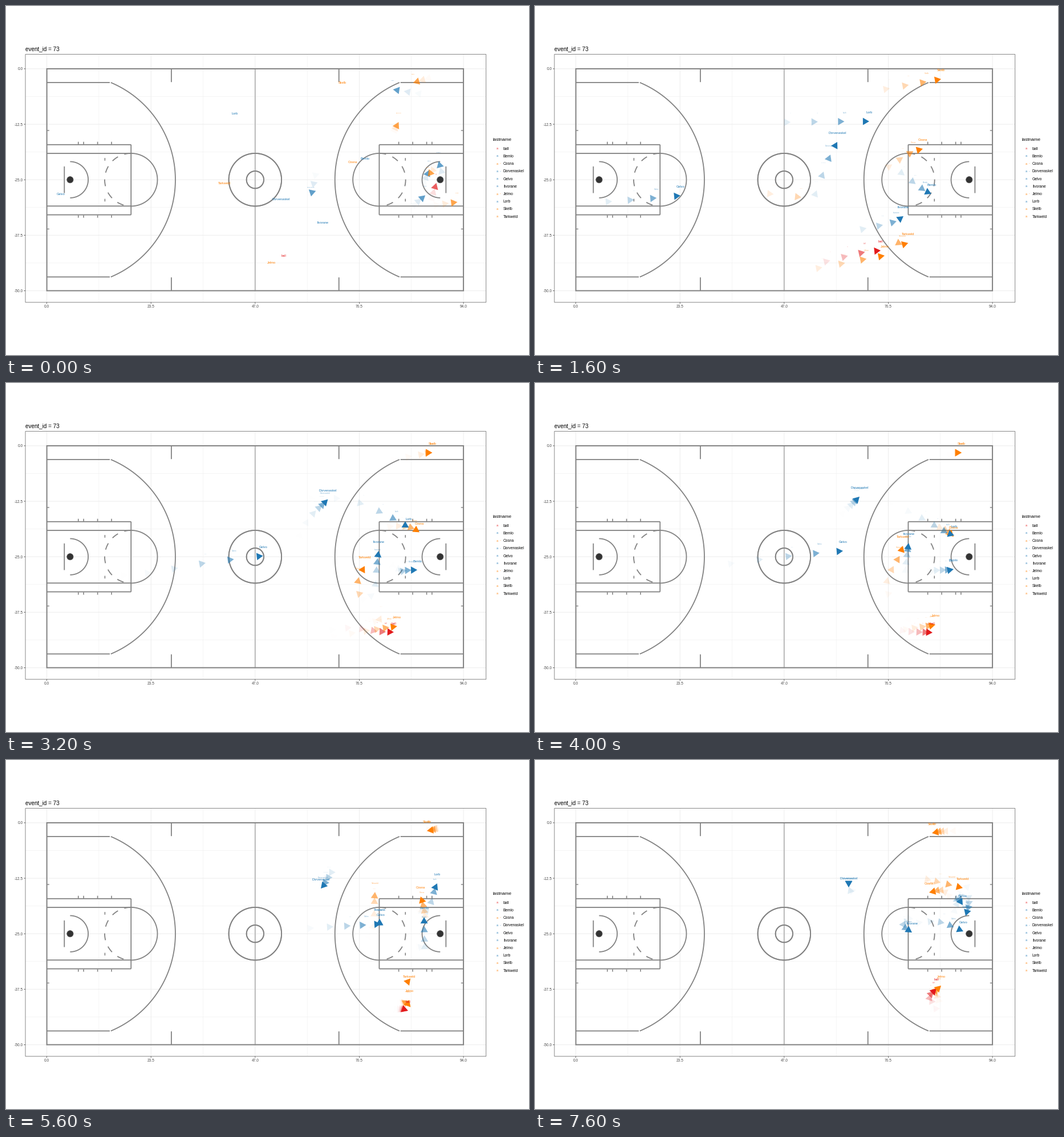
A matplotlib script for the animation above (8 s loop, 917x611 px).

```python
import numpy as np
import matplotlib.pyplot as plt
from matplotlib.animation import FuncAnimation
from matplotlib.collections import PolyCollection
from matplotlib.colors import to_rgba
from matplotlib.patches import Circle, Rectangle

W, H, DPI = 917, 611, 100
FRAMES, INTERVAL = 20, 400
PX = 72 / DPI
FOOT = 7.771                      # pixels per foot
LEFT, TOP = 71.6, 109.9
RIGHT, BOTTOM = LEFT + 94 * FOOT, TOP + 50 * FOOT
MID_X, MID_Y = (LEFT + RIGHT) / 2, (TOP + BOTTOM) / 2
RED, BLUE, ORANGE = "#e31a1c", "#1f78b4", "#ff7f00"
GREY = "#828282"

plt.rcParams["font.family"] = "Liberation Sans"
plt.rcParams["path.snap"] = False
fig = plt.figure(figsize=(W / DPI, H / DPI), dpi=DPI, facecolor="white")
ax = fig.add_axes([0, 0, 1, 1])
ax.set(xlim=(0, W), ylim=(H, 0))
ax.axis("off")


def line(xs, ys, color=GREY, width=1.8, z=2, **kw):
    ax.plot(xs, ys, color=color, lw=width * PX, zorder=z,
            solid_capstyle="butt", **kw)


def text(x, y, s, size, color="black", ha="center", **kw):
    return ax.text(x, y, s, fontsize=size * PX, color=color, ha=ha,
                   va="center_baseline", **kw)


def box(x0, y0, x1, y1, color, width, z):
    ax.add_patch(Rectangle((x0, y0), x1 - x0, y1 - y0, fill=False,
                           ec=color, lw=width * PX, zorder=z))


def draw_panel():
    x0, x1, y0, y1 = 34, 841.7, 84.6, 518.8
    for k in range(9):
        major = k % 2 == 0
        width = 0.9 if major else 0.45
        x, y = LEFT + k * 11.75 * FOOT, TOP + k * 6.25 * FOOT
        line([x, x], [y0, y1], "#ebebeb", width, 1)
        line([x0, x1], [y, y], "#ebebeb", width, 1)
        if major:
            line([x, x], [y1, y1 + 2.5], "#333333", 0.8)
            line([x0 - 2.5, x0], [y, y], "#333333", 0.8)
            text(x, 526, f"{k * 11.75:.1f}", 6.7, "#4d4d4d")
            text(30, y, f"{-k * 6.25:.1f}", 6.7, "#4d4d4d", "right")
    box(x0, y0, x1, y1, "#7a7a7a", 0.9, 6)
    text(34, 74, "event_id = 73", 9.9, ha="left")


def draw_half(side):
    """One half of the court in feet from its hoop end; side is 1 or -1."""
    def seg(xa, ya, xb, yb, width=1.8):
        for s in (-1, 1):
            line(MID_X + side * (np.array([xa, xb]) - 47) * FOOT,
                 MID_Y + s * np.array([ya, yb]) * FOOT, width=width)

    def curve(x, r, start, end, **kw):
        a = np.radians(np.linspace(start, end, 120))
        line(MID_X + side * (x - 47 + r * np.cos(a)) * FOOT,
             MID_Y + r * np.sin(a) * FOOT, **kw)

    hoop, foul, three, corner = 5.25, 19, 23.75, 21.9
    angle = np.degrees(np.arcsin(corner / three))
    curve(hoop, three, -angle, angle)
    curve(hoop, 4.08, -90, 90)
    curve(foul, 5.95, -90, 90)
    curve(foul, 5.95, 270, 90, dashes=(12 / 1.8, 12 / 1.8))
    curve(47, 5.95, 0, 360)
    curve(47, 1.95, 0, 360)
    seg(0, corner, 14.2, corner)
    seg(0, 7.9, foul, 7.9)
    seg(0, 5.93, foul, 5.93)
    seg(foul, 0, foul, 7.9)
    seg(3.95, 0, 3.95, 3)
    seg(28.1, 22, 28.1, 25)
    seg(0, 11.1, 0.55, 11.1, 1.4)
    seg(13.1, 4.3, 13.1, 4.9, 1.6)
    for x in (7.1, 8.3, 11.45, 14.6):
        seg(x, 8, x, 8.55, 1.6)
    ax.add_patch(Circle((MID_X + side * (hoop - 47) * FOOT, MID_Y), 5.6,
                        fc="#333333", ec="#555555", lw=0.8 * PX, zorder=3))


def draw_court():
    line([MID_X, MID_X], [TOP, BOTTOM], "#b9b9b9", 2)
    draw_half(1)
    draw_half(-1)
    box(LEFT, TOP, RIGHT, BOTTOM, GREY, 2, 2)


def ease_through(times, values):
    """Monotone cubic through the key values, read at every step."""
    t, v = np.array(times, float), np.array(values, float)
    h = np.diff(t)
    d = np.diff(v) / h
    a, b = d[:-1], d[1:]
    same = a * b > 0
    inner = np.where(same, 2 * a * b / np.where(same, a + b, 1), 0)
    m = np.concatenate([d[:1], inner, d[-1:]])
    n = np.arange(FRAMES)
    i = np.clip(np.searchsorted(t, n, side="right") - 1, 0, len(h) - 1)
    u = (n - t[i]) / h[i]
    return ((1 + 2 * u) * (1 - u)**2 * v[i] + u * (1 - u)**2 * h[i] * m[i]
            + u**2 * (3 - 2 * u) * v[i + 1] - u**2 * (1 - u) * h[i] * m[i + 1])


players = []
TIMES = (0, 4, 6, 10, 14, 16, 19)


def player(name, color, xs, ys, last, drift, times=TIMES):
    """xs, ys: path keys; last, drift: end and pace of the play before."""
    drift = np.array(drift, float)
    tip = np.array(last) + 5.5 * drift / np.hypot(*drift)
    path = np.column_stack([ease_through(times, xs), ease_through(times, ys)])
    players.append((name, color, path, tip, drift))


player("ball", RED, (487, 606, 651, 697, 705, 692, 704),
       (453, 428, 435, 437, 439, 416, 400), (753, 315), (3, -10))
player("Bemlo", BLUE, (630, 695, 703, 734, 733, 743, 750),
       (283, 329, 328, 326, 275, 246, 254), (740, 292), (3, -7))
player("Cosna", ORANGE, (608, 680, 707, 734, 727, 712, 691),
       (289, 250, 252, 269, 239, 228, 232), (743, 294), (-4, 5))
player("Dorvenaskel", BLUE, (482, 530, 554, 569, 552, 550, 550),
       (354, 238, 214, 199, 225, 222, 223), (536, 328), (-3, 15))
player("Gelvo", BLUE, (96, 255, 350, 540, 657, 700, 751),
       (345, 332, 315, 294, 287, 282, 300), (731, 335), (7, -6))
player("Ilvorane", BLUE, (555, 646, 650, 655, 655, 647, 661),
       (395, 368, 321, 280, 278, 290, 302), (760, 277), (-3, -11))
player("Jelmo", ORANGE, (465, 613, 657, 702, 707, 703, 712),
       (465, 437, 430, 423, 420, 406, 395), (786, 344), (15, -2))
player("Lorb", BLUE, (401, 586, 661, 735, 756, 761, 755),
       (204, 202, 228, 267, 216, 248, 273), (684, 147), (-19, -3))
player("Skelb", ORANGE, (590, 712, 746, 748, 738, 713, 696),
       (150, 128, 122, 122, 124, 125, 128), (719, 133), (-10, 3))
# This player's tracking jumps across the court, so its keys sit at the jumps.
player("Tarkweld", ORANGE, (383, 467, 644, 658, 614, 645, 647, 707, 688, 750),
       (326, 335, 418, 407, 364, 285, 231, 395, 209, 224), (686, 208), (2, -4),
       times=(0, 2, 3, 5, 6, 10, 13, 14, 15, 19))


def draw_legend():
    text(854, 234, "lastname", 8.2, ha="left")
    for i, (name, color, *_) in enumerate(players):
        y = 249.2 + 13.22 * i
        text(861, y, "a", 5.6, color, alpha=0.85)
        if name[0] in "CDJ":
            text(866.3, y, "-", 5, color, alpha=0.85)
        text(872, y, name, 6.7, ha="left")


def arrow_head(tip, step):
    """Closed arrow head that ends at tip and points along step."""
    d = step / max(np.hypot(*step), 1e-6)
    side = np.array([-d[1], d[0]]) * 6.4
    base = tip - d * 11.1
    return [tip, base + side, base - side]


draw_panel()
draw_court()
draw_legend()

heads = PolyCollection([], linewidths=0, zorder=4)
ax.add_collection(heads)
labels = []


def update(n):
    while labels:
        labels.pop().remove()
    shapes, colors = [], []

    def mark(name, color, tip, step, fade, scale):
        if step is not None:
            shapes.append(arrow_head(tip, step))
            colors.append(to_rgba(color, fade))
        if scale > 0.1:
            labels.append(text(tip[0], tip[1] - 2 * FOOT, name, 5.6 * scale,
                               color, alpha=fade, zorder=5))

    if n < 3:
        for k in (2, 1, 0):
            fade = 0.7 * 0.2 ** (k + n)
            for name, color, _, tip, drift in players:
                mark(name, color, tip - k * drift, drift, fade, 0.6 * fade)
    for age in range(min(n, 5), -1, -1):
        fade, m = (1 - age / 6) ** 3, n - age
        for name, color, path, *_ in players:
            step = path[m] - path[m - 1] if m else None
            mark(name, color, path[m], step, fade, fade)
    heads.set_verts(shapes)
    heads.set_facecolor(colors if colors else "none")
    return [heads, *labels]


anim = FuncAnimation(fig, update, frames=FRAMES, interval=INTERVAL,
                     repeat=True, repeat_delay=0, blit=False)
plt.show()
```
